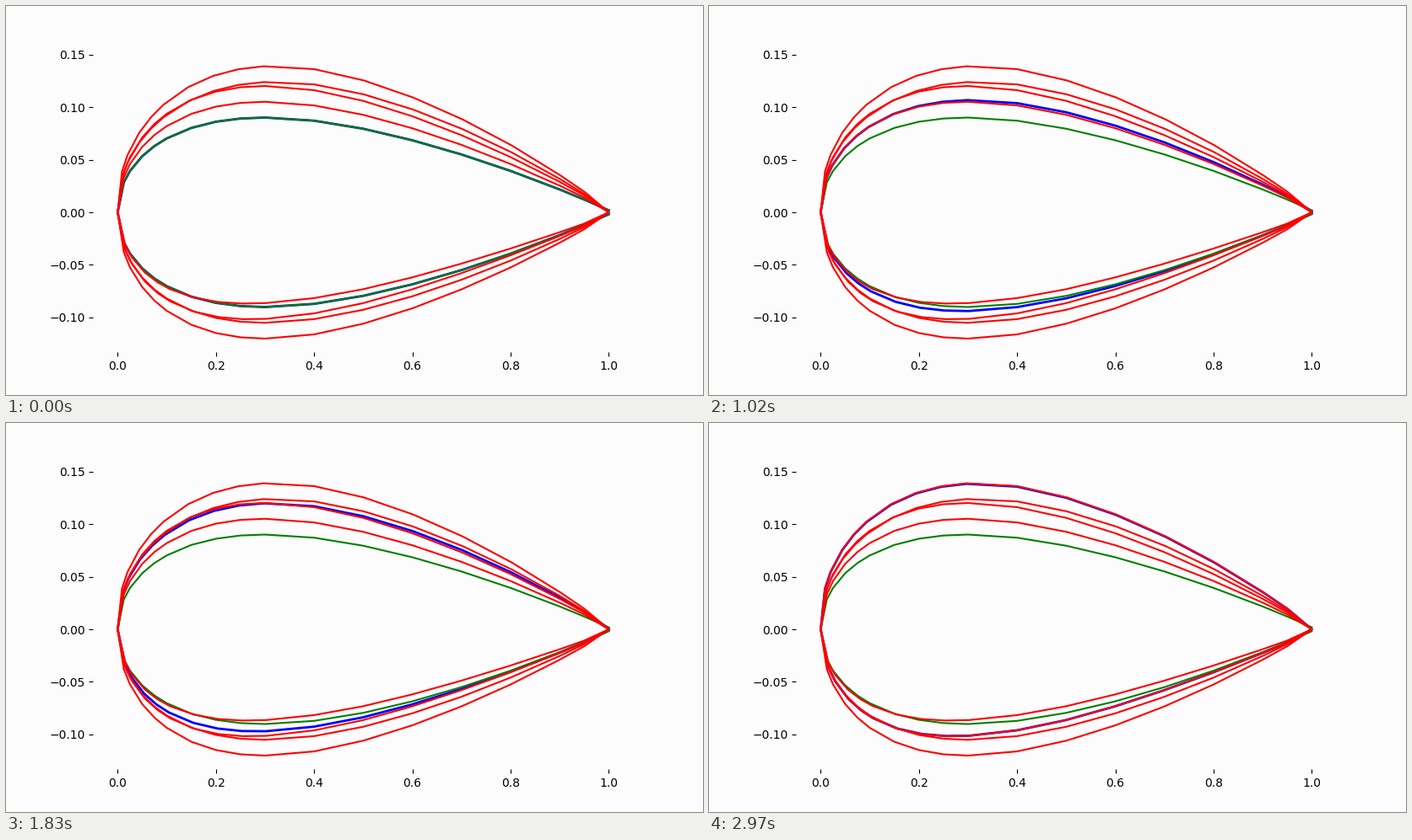
A matplotlib script that plays this animation: 826x462 px, repeating every 3 s.

```python
import numpy as np
import matplotlib.pyplot as plt
from matplotlib.animation import FuncAnimation

FRAMES, INTERVAL = 100, 30

# Chordwise stations, leading edge to trailing edge
STATIONS = np.array([0, .0125, .025, .05, .075, .1, .15, .2, .25, .3,
                     .4, .5, .6, .7, .8, .9, .95, 1])


def airfoil(thickness, camber=0.0, peak=0.4, closed=True):
    """Four-digit section as an outline: upper side, nose, lower side."""
    x = STATIONS
    half = 5 * thickness * (0.2969 * np.sqrt(x) - 0.1260 * x - 0.3516 * x**2
                            + 0.2843 * x**3 - 0.1015 * x**4)
    if closed:
        half[-1] = 0
    scale = camber / np.where(x < peak, peak, 1 - peak)**2
    mean = scale * (np.where(x < peak, 0, 1 - 2 * peak) + 2 * peak * x - x**2)
    angle = np.arctan(2 * scale * (peak - x))
    dx, dy = half * np.sin(angle), half * np.cos(angle)
    upper = np.column_stack([x - dx, mean + dy])
    lower = np.column_stack([x + dx, mean - dy])
    return np.vstack([upper[::-1], lower[1:]])


base = airfoil(0.18, closed=False)
goal = airfoil(0.24, camber=0.02)
family = [airfoil(0.21), airfoil(0.24), airfoil(0.21, camber=0.02), goal]

fig, ax = plt.subplots(figsize=(8.26, 4.62), dpi=100, facecolor="#fcfcfc")
ax.set_facecolor("#fcfcfc")
ax.spines[:].set_visible(False)

morph, = ax.plot(*base.T, color="blue", lw=2)
ax.plot(*base.T, color="green", lw=1.5)
for outline in family:
    ax.plot(*outline.T, color="red", lw=1.5)

# Keep the view fixed while the blue outline moves
ax.set_xlim(ax.get_xlim())
ax.set_ylim(ax.get_ylim())


def update(i):
    t = i / FRAMES
    morph.set_data(*((1 - t) * base + t * goal).T)
    return morph,


anim = FuncAnimation(fig, update, frames=FRAMES, interval=INTERVAL,
                     repeat=True, repeat_delay=0)
plt.show()
```
